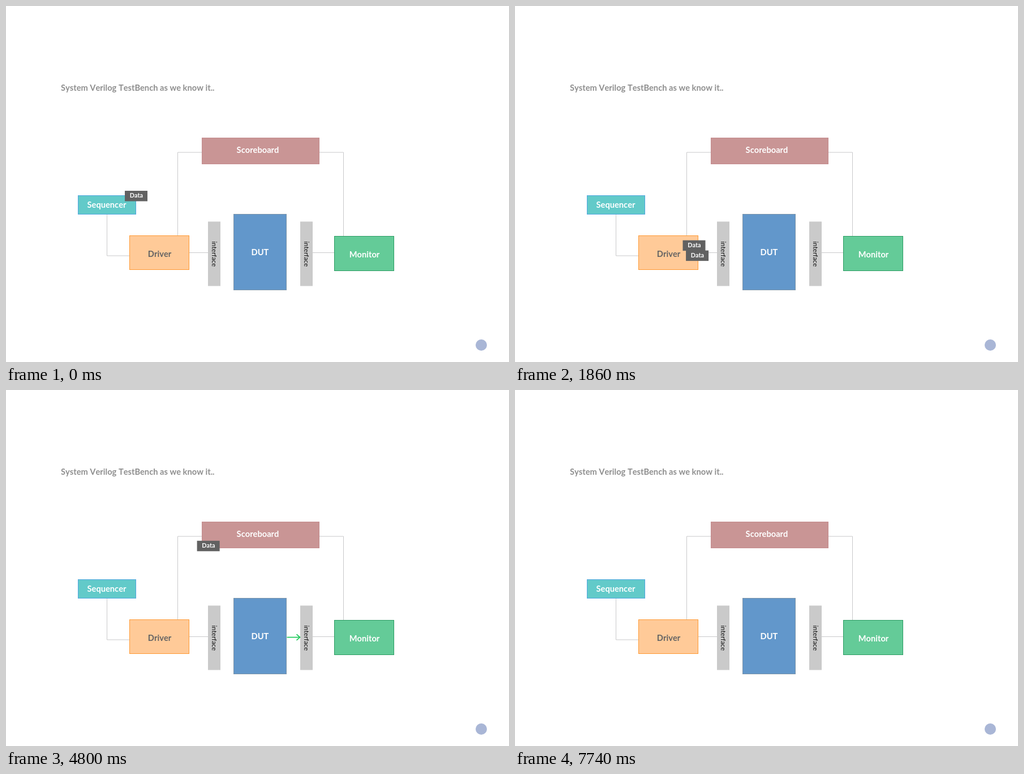
These frames come from a looping animation (889x630 px, 8 s). An HTML page with a canvas:

```html
<!DOCTYPE html>
<html lang="en">
<head>
<meta charset="utf-8">
<title>Test bench data flow</title>
<style>
  html, body { margin: 0; width: 100%; height: 100%; overflow: hidden; background: #fff; }
  canvas { display: block; }
</style>
</head>
<body>
<canvas id="stage" width="889" height="630"></canvas>
<script>
const ctx = document.getElementById('stage').getContext('2d');
const LOOP = 8000, STEP = 60;
const LABEL = 'bold 14.67px Lato, Carlito, sans-serif';
const SMALL = 'bold 10.8px Lato, Carlito, sans-serif';
const SIDE = '11.5px Lato, Carlito, sans-serif';

const easeQuad = p => p < .5 ? 2 * p * p : 1 - 2 * (1 - p) ** 2;
const easeCubic = p => p < .5 ? 4 * p ** 3 : 1 - 4 * (1 - p) ** 3;

// Times are in steps of 60 ms; a route holds its place after "stop".
const routes = [
  { points: [[296.5, 432.8], [296.5, 266.8], [346.7, 266.8]],
    show: 29, hide: 129, start: 26.9, span: 20, stop: 44, ease: easeQuad },
  { points: [[210, 327], [210, 359.5], [158, 359.5], [158, 432.6], [354, 432.6]],
    show: 0, hide: 42, start: .62, span: 41.67, stop: 42, ease: easeQuad },
  { points: [[565, 432.5], [580, 432.5], [580, 261], [509, 261]],
    show: 99, hide: 129, start: 99.2, span: 30, stop: 124, ease: easeCubic }
];

function text(str, x, y, font, color, align = 'center') {
  ctx.font = font;
  ctx.fontKerning = 'none';
  ctx.fillStyle = color;
  ctx.textAlign = align;
  ctx.fillText(str, x, y);
}

function box(x, y, w, h, fill, edge) {
  ctx.fillStyle = fill;
  ctx.fillRect(x, y, w, h);
  if (!edge) return;
  ctx.strokeStyle = edge;
  ctx.lineWidth = 1;
  ctx.strokeRect(x + .5, y + .5, w - 1, h - 1);
}

function line(points, color, width) {
  ctx.strokeStyle = color;
  ctx.lineWidth = width;
  ctx.beginPath();
  points.forEach(([x, y]) => ctx.lineTo(x, y));
  ctx.stroke();
}

function arrow(x1, x2, y) {
  line([[x1, y], [x2, y]], '#1fc85a', 1.7);
  line([[x2 - 6, y - 5.3], [x2, y], [x2 - 6, y + 5.3]], '#1fc85a', 1.7);
}

function port(x) {
  box(x, 381.5, 22, 114, '#cacaca');
  ctx.save();
  ctx.translate(x + 6.5, 439);
  ctx.rotate(Math.PI / 2);
  text('interface', 0, 0, SIDE, '#111');
  ctx.restore();
}

function pointAlong(points, share) {
  const lengths = points.slice(1).map(([x, y], i) =>
    Math.hypot(x - points[i][0], y - points[i][1]));
  let left = share * lengths.reduce((a, b) => a + b, 0);
  for (let i = 0; i < lengths.length; i++) {
    if (left <= lengths[i]) {
      const k = left / lengths[i], [ax, ay] = points[i], [bx, by] = points[i + 1];
      return [ax + (bx - ax) * k, ay + (by - ay) * k];
    }
    left -= lengths[i];
  }
  return points[points.length - 1];
}

function packet(route, step) {
  if (step < route.show || step >= route.hide) return;
  const p = (Math.min(step, route.stop) - route.start) / route.span;
  const [x, y] = pointAlong(route.points, route.ease(Math.max(0, Math.min(1, p))));
  box(x, y, 40, 18.5, '#616161');
  text('Data', x + 20.3, y + 12.4, SMALL, '#fff');
}

function diagram() {
  ctx.fillStyle = '#fff';
  ctx.fillRect(0, 0, 889, 630);
  text('System Verilog TestBench as we know it..', 97, 150, LABEL, '#8e8e8e', 'left');

  const wires = [
    [[178.5, 369], [178.5, 442], [218, 442]],
    [[303.5, 406], [303.5, 259], [346, 259]],
    [[554, 259], [596.5, 259], [596.5, 407]],
    [[324, 436.5], [357, 436.5]],
    [[542, 436.5], [580, 436.5]]
  ];
  wires.forEach(w => line(w, '#c9c9cb', 1));

  box(346, 233, 208, 47, '#c99595', '#c48a8c');
  text('Scoreboard', 445, 260, LABEL, '#fff');
  box(127, 335, 103, 34, '#62cac9', '#4fa6e0');
  text('Sequencer', 178, 357, LABEL, '#fff');
  box(218, 406, 106, 61, '#ffca98', '#ff9933');
  text('Driver', 271.5, 443.5, LABEL, '#636363');
  box(402, 368, 94, 135, '#6297cb', '#7b93a8');
  text('DUT', 449, 441.4, LABEL, '#fff');
  box(580, 407, 106, 62, '#64cb98', '#2b9c62');
  text('Monitor', 633.5, 445.3, LABEL, '#fff');
  port(357);
  port(520);

  ctx.fillStyle = '#a9b6d6';
  ctx.beginPath();
  ctx.arc(840, 600, 10, 0, Math.PI * 2);
  ctx.fill();
}

function draw(now) {
  const step = Math.floor((now % LOOP) / STEP);
  diagram();
  if (step >= 42 && step < 60) arrow(379, 399.5, 438.8);
  if (step >= 80 && step < 99) arrow(496.5, 519.5, 437.6);
  routes.forEach(route => packet(route, step));
}

const begin = performance.now();
function tick() {
  draw(performance.now() - begin);
  requestAnimationFrame(tick);
}
tick();
</script>
</body>
</html>
```
